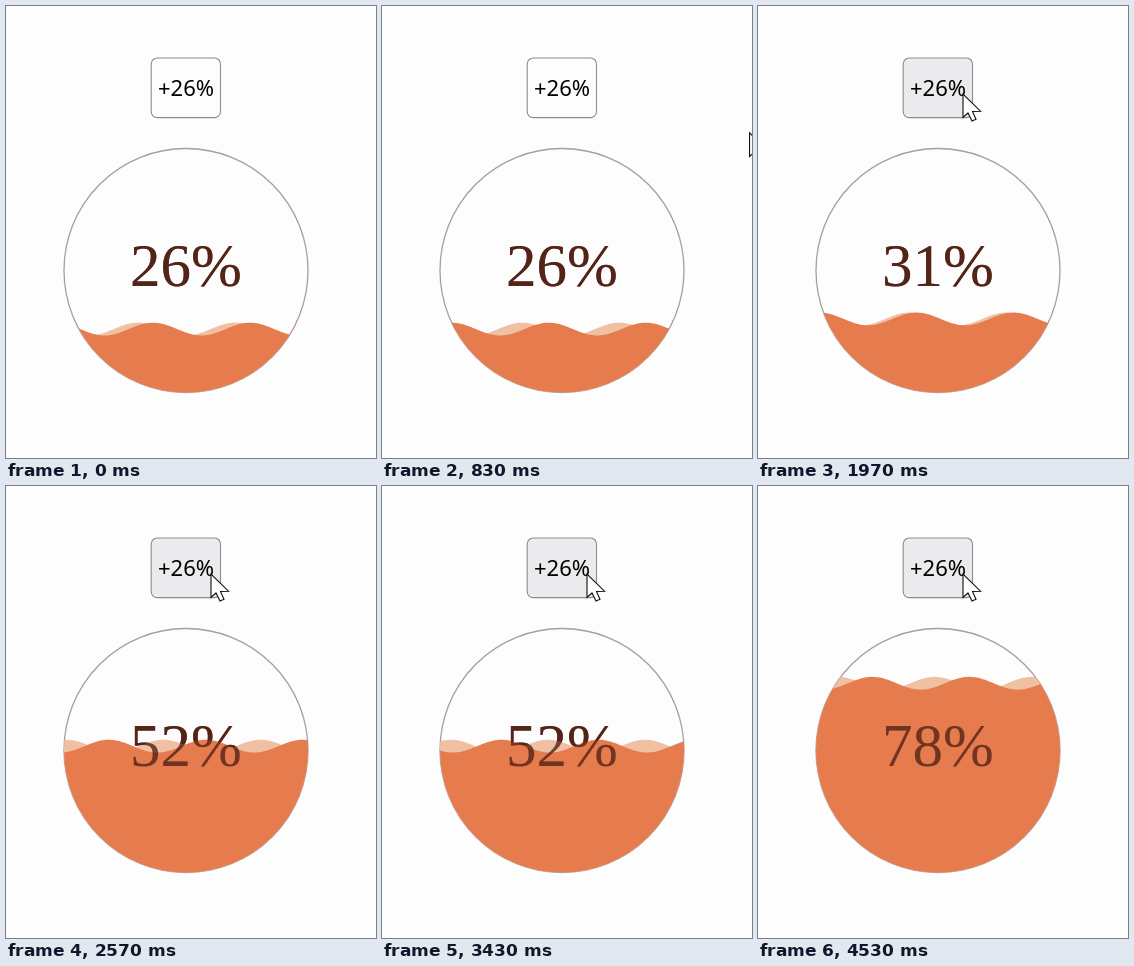
Write an HTML page with a canvas that moves like this. It is 370 by 452 pixels and loops after 4.56 s.

```html
<!DOCTYPE html>
<html lang="en">
<head>
<meta charset="utf-8">
<title>Liquid gauge</title>
<style>
  html, body { margin: 0; width: 100%; height: 100%; overflow: hidden; background: #fdfdfd; }
  canvas { display: block; }
</style>
</head>
<body>
<canvas id="stage" width="370" height="452"></canvas>
<script>
const ctx = document.getElementById('stage').getContext('2d');
const LOOP = 4560;
const STEP = 100 / 3;
const PAGE = '#fdfdfd';
const BALL = { x: 180, y: 264.5, r: 122 };
const WAVE = { length: 97, height: 6.4 };

const clamp = v => Math.min(1, Math.max(0, v));
const progress = (t, start, duration) => clamp((t - start) / duration);
const mix = (a, b, p) => a + (b - a) * p;

// Each click adds 26 percent, one per 60 Hz tick.
function percentAt(t) {
  const rise = 26 * 1000 / 60;
  return 26 + 26 * progress(t, 1897, rise) + 26 * progress(t, 3793, rise);
}

function drawButton(t) {
  ctx.beginPath();
  ctx.roundRect(145.2, 52, 69.3, 59.6, 6);
  ctx.fillStyle = `rgba(235, 235, 237, ${progress(t, 1050, 200)})`;
  ctx.fill();
  ctx.strokeStyle = '#8c8c94';
  ctx.lineWidth = 1.1;
  ctx.stroke();
  ctx.font = '22px "Noto Sans", "Open Sans", sans-serif';
  ctx.fillStyle = '#000';
  ctx.fillText('+26%', 180, 90);
}

function traceBall() {
  ctx.beginPath();
  ctx.arc(BALL.x, BALL.y, BALL.r, 0, 2 * Math.PI);
}

function drawWave(level, crest, color) {
  const left = BALL.x - BALL.r;
  const right = BALL.x + BALL.r;
  ctx.beginPath();
  ctx.moveTo(left, BALL.y + BALL.r);
  for (let x = left; x <= right; x++) {
    ctx.lineTo(x, level - WAVE.height * Math.cos((x - crest) * 2 * Math.PI / WAVE.length));
  }
  ctx.lineTo(right, BALL.y + BALL.r);
  ctx.fillStyle = color;
  ctx.fill();
}

function drawLabel(percent, color) {
  ctx.font = '61px "Liberation Serif", "Times New Roman", serif';
  ctx.fillStyle = color;
  ctx.fillText(Math.ceil(percent - 1e-6) + '%', 180, 280);
}

function drawBall(t) {
  const percent = percentAt(t);
  const level = 386 - percent * 2.42;
  drawLabel(percent, '#562518');
  traceBall();
  ctx.strokeStyle = '#aa9c9c';
  ctx.lineWidth = 1.3;
  ctx.stroke();

  ctx.save();
  traceBall();
  ctx.clip();
  drawWave(level, 132 + t * 0.0099, '#f0c0a2');
  drawWave(level, 147 - t * 0.0928, '#e67b4d');
  ctx.restore();

  drawLabel(percent, 'rgba(86, 37, 24, .82)');
}

function drawCursor(t) {
  if (t < 825) return;
  const p = 1 - (1 - progress(t, 833, 370)) ** 3;
  ctx.save();
  ctx.translate(mix(368, 205, p), mix(127, 88, p));
  ctx.beginPath();
  ctx.moveTo(0, 0);
  [[0, 23.5], [5, 19], [9, 27], [13, 25.3], [9.5, 17.5], [17.5, 17.2]]
    .forEach(([x, y]) => ctx.lineTo(x, y));
  ctx.closePath();
  ctx.fillStyle = '#fff';
  ctx.fill();
  ctx.strokeStyle = '#111';
  ctx.lineWidth = 1.1;
  ctx.stroke();
  ctx.restore();
}

function render() {
  const elapsed = performance.now() % LOOP;
  const t = Math.floor((elapsed + 5) / STEP) * STEP;
  ctx.fillStyle = PAGE;
  ctx.fillRect(0, 0, 370, 452);
  ctx.textAlign = 'center';
  drawButton(t);
  drawBall(t);
  drawCursor(t);
  requestAnimationFrame(render);
}
render();
</script>
</body>
</html>
```
